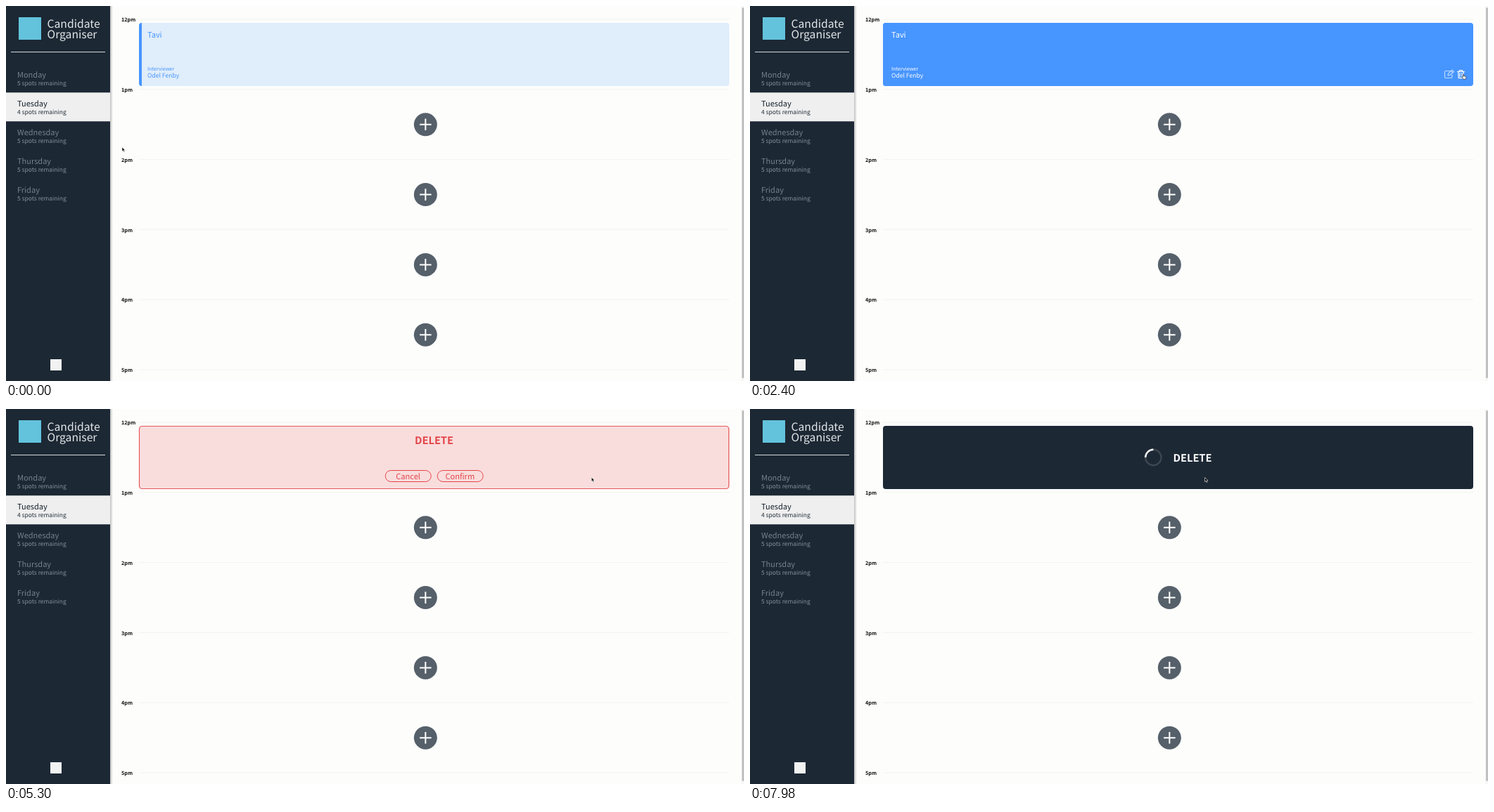
An HTML page for the animation above (8000 ms loop, 1049 by 534 pixels).

```html
<!DOCTYPE html>
<html lang="en">
<head>
<meta charset="utf-8">
<title>Interview booking</title>
<style>
  html, body { margin: 0; width: 100%; height: 100%; overflow: hidden; background: #fdfdfc; }
  svg { display: block; width: 100%; height: 100%; }
  text {
    font-family: "Noto Sans CJK JP", "Noto Sans CJK SC", "Noto Sans CJK", "Open Sans", sans-serif;
    text-rendering: geometricPrecision;
  }
  .title { font-size: 15.7px; font-weight: 300; fill: #e3e6e8; }
  .day { font-size: 11px; fill: #74828f; }
  .spots { font-size: 8.45px; font-weight: 300; fill: #86929d; }
  .active .day { fill: #15202b; }
  .active .spots { fill: #202b36; }
  .hour { font-size: 7.3px; font-weight: 700; fill: #111; }
  .name { font-size: 11px; }
  .label { font-size: 7.15px; font-weight: 300; }
  .person { font-size: 8.6px; }
  .heading { font-size: 14.6px; font-weight: 700; text-anchor: middle; }
  .button { font-size: 11.1px; text-anchor: middle; fill: #e34548; }
  .icon { fill: none; stroke: #fff; stroke-width: 1.2; stroke-linejoin: round; stroke-linecap: round; }
</style>
</head>
<body>
<svg viewBox="0 0 1049 534" preserveAspectRatio="none">
  <defs>
    <linearGradient id="shade">
      <stop stop-color="#000" stop-opacity=".24"/>
      <stop offset="1" stop-color="#000" stop-opacity="0"/>
    </linearGradient>
  </defs>
  <rect width="1049" height="534" fill="#fdfdfc"/>
  <rect x="148" width="4" height="534" fill="url(#shade)"/>
  <rect width="148" height="534" fill="#1c2834"/>
  <rect x="18" y="16" width="32" height="32" fill="#63c3dc"/>
  <text class="title" x="58.5" y="31">Candidate</text>
  <text class="title" x="58.5" y="46">Organiser</text>
  <path d="M7 65.5H141" stroke="#d5d9dc"/>
  <rect x="63" y="503" width="16" height="16" fill="#f2f2f2"/>
  <g id="menu"></g>
  <g id="slots"></g>
  <rect x="1045" width="4" height="534" fill="#f7f7f7"/>
  <rect x="1046" y="2" width="3" height="528" rx="1.5" fill="#c1c1c1"/>

  <g id="booking">
    <rect id="card" x="189" y="24" width="839" height="90" rx="4"/>
    <path id="edge" d="M193 24V114A4 4 0 0 1 189 110V28A4 4 0 0 1 193 24" fill="#4795ff"/>
    <g id="details">
      <text class="name" x="201" y="45.3">Tavi</text>
      <text class="label" x="201" y="92">Interviewer</text>
      <text class="person" x="201" y="102.3">Odel Fenby</text>
    </g>
    <g id="tools">
      <path id="edit" class="icon" d="M995 92.5H989Q987.5 92.5 987.5 94V101Q987.5 102.5 989 102.5H996.5Q998 102.5 998 101V98M992 99L992.5 96.3L998 91.2L1000.4 93.5L994.8 98.6ZM996.6 92.5L999 94.9"/>
      <path id="trash" class="icon" d="M1005.7 93.3H1015.3M1008.5 93.3V91.5H1012.5V93.3M1006.7 93.5L1007.2 102.7H1013.8L1014.3 93.5M1009 95.7V100.6M1012 95.7V100.6"/>
    </g>
  </g>

  <g id="confirm">
    <rect x="189.5" y="24.5" width="838" height="89" rx="4" fill="#f9dddd" stroke="#e5575a" stroke-width="1.2"/>
    <text class="heading" x="608.5" y="50.3" fill="#e34548">DELETE</text>
    <g stroke="#e34548" fill="none">
      <rect x="539.2" y="87.5" width="65" height="16" rx="8"/>
      <rect id="confirmBox" x="613.2" y="87.5" width="65" height="16" rx="8"/>
    </g>
    <text class="button" x="571.6" y="100">Cancel</text>
    <text id="confirmText" class="button" x="645.3" y="100">Confirm</text>
  </g>

  <g id="status">
    <rect x="189" y="24" width="839" height="90" rx="4" fill="#1c2834"/>
    <g transform="translate(573.3 69)" fill="none" stroke-width="2.4">
      <circle r="11.2" stroke="#3b4651"/>
      <path id="spinner" d="M-11.2 0A11.2 11.2 0 0 1 0 -11.2" stroke="#f4f5f4"/>
    </g>
    <text class="heading" x="629" y="75" fill="#fff">DELETE</text>
  </g>

  <g id="cursor" stroke="#fff" stroke-width=".6" stroke-linejoin="round">
    <path id="arrow" d="M0 0V6L1.4 4.8L2.4 7L3.5 6.5L2.5 4.4H4.3Z" fill="#000"/>
    <path id="hand" d="M0 .5Q.6 -.4 1.2 .5V2.7L3.7 3.2Q4.6 3.6 4.5 4.5L4 7.2H.6L-1.5 4.5Q-1.5 3.5 -.6 3.9L0 4.4Z" fill="#fff" stroke="#111"/>
  </g>
</svg>
<script>
  const LOOP = 8000;
  const $ = id => document.getElementById(id);
  const show = (id, on) => $(id).style.display = on ? "" : "none";

  $("menu").innerHTML = ["Monday", "Tuesday", "Wednesday", "Thursday", "Friday"].map((day, i) => {
    const active = i === 1;
    return `<g transform="translate(0 ${i * 41.05})" class="${active ? "active" : ""}">
      ${active ? '<rect y="82.2" width="148" height="41" fill="#efefef"/>' : ""}
      <text class="day" x="16" y="102">${day}</text>
      <text class="spots" x="16" y="113.2">${active ? 4 : 5} spots remaining</text></g>`;
  }).join("");

  $("slots").innerHTML = [12, 1, 2, 3, 4, 5].map((hour, i) => {
    const plus = i > 0 && i < 5 && `<circle cx="596.3" cy="69" r="16.5" fill="#56606a"/>
      <path d="M588 69H604.6M596.3 60.7V77.3" stroke="#fff" stroke-width="2"/>`;
    return `<g transform="translate(0 ${i * 99.8})">
      <text class="hour" x="164" y="22.3">${hour}pm</text>
      <path d="M189 19H1028" stroke="#f3f4ec"/>${plus || ""}</g>`;
  }).join("");

  // Pointer stops: time, x, y
  const stops = [
    [0, 165, 201], [60, 165, 201], [820, 800, 117], [1150, 945, 98], [1380, 953, 97],
    [1640, 954, 97], [2150, 1013, 97], [2700, 1014, 97], [3300, 1010, 96.5],
    [4950, 1010, 96.5], [5650, 656, 98], [5950, 646.5, 97.5], [LOOP, 646.5, 97.5]
  ];

  function pointerAt(t) {
    const i = stops.findIndex(stop => stop[0] > t);
    const [t0, x0, y0] = stops[i - 1], [t1, x1, y1] = stops[i];
    const u = (t - t0) / (t1 - t0), k = u * u * (3 - 2 * u);
    return [x0 + (x1 - x0) * k, y0 + (y1 - y0) * k];
  }

  function draw(t) {
    const [x, y] = pointerAt(t);
    const asking = t >= 4260 && t < 7340, deleting = t >= 7340;
    const overCard = x > 189 && y < 114;
    const overTrash = !asking && !deleting && x > 1004;
    const overConfirm = asking && x < 678;

    show("booking", !asking && !deleting);
    show("confirm", asking);
    show("status", deleting);

    $("card").setAttribute("fill", overCard ? "#4795ff" : "#e0edfa");
    $("details").setAttribute("fill", overCard ? "#fff" : "#4795ff");
    show("tools", overCard);
    $("edit").style.opacity = !asking && x > 986 && x < 1002 ? 1 : .65;
    $("trash").style.opacity = overTrash ? 1 : .65;

    $("confirmBox").setAttribute("fill", overConfirm ? "#e94446" : "none");
    $("confirmText").style.fill = overConfirm ? "#fff" : "";
    $("spinner").setAttribute("transform", `rotate(${(t - 7980) * .36})`);

    const pointing = overTrash || (overConfirm && t < 7200);
    show("hand", pointing);
    show("arrow", !pointing);
    $("cursor").setAttribute("transform", `translate(${x} ${y})`);
  }

  const start = performance.now();
  function tick() {
    draw((performance.now() - start) % LOOP);
    requestAnimationFrame(tick);
  }
  tick();
</script>
</body>
</html>
```
